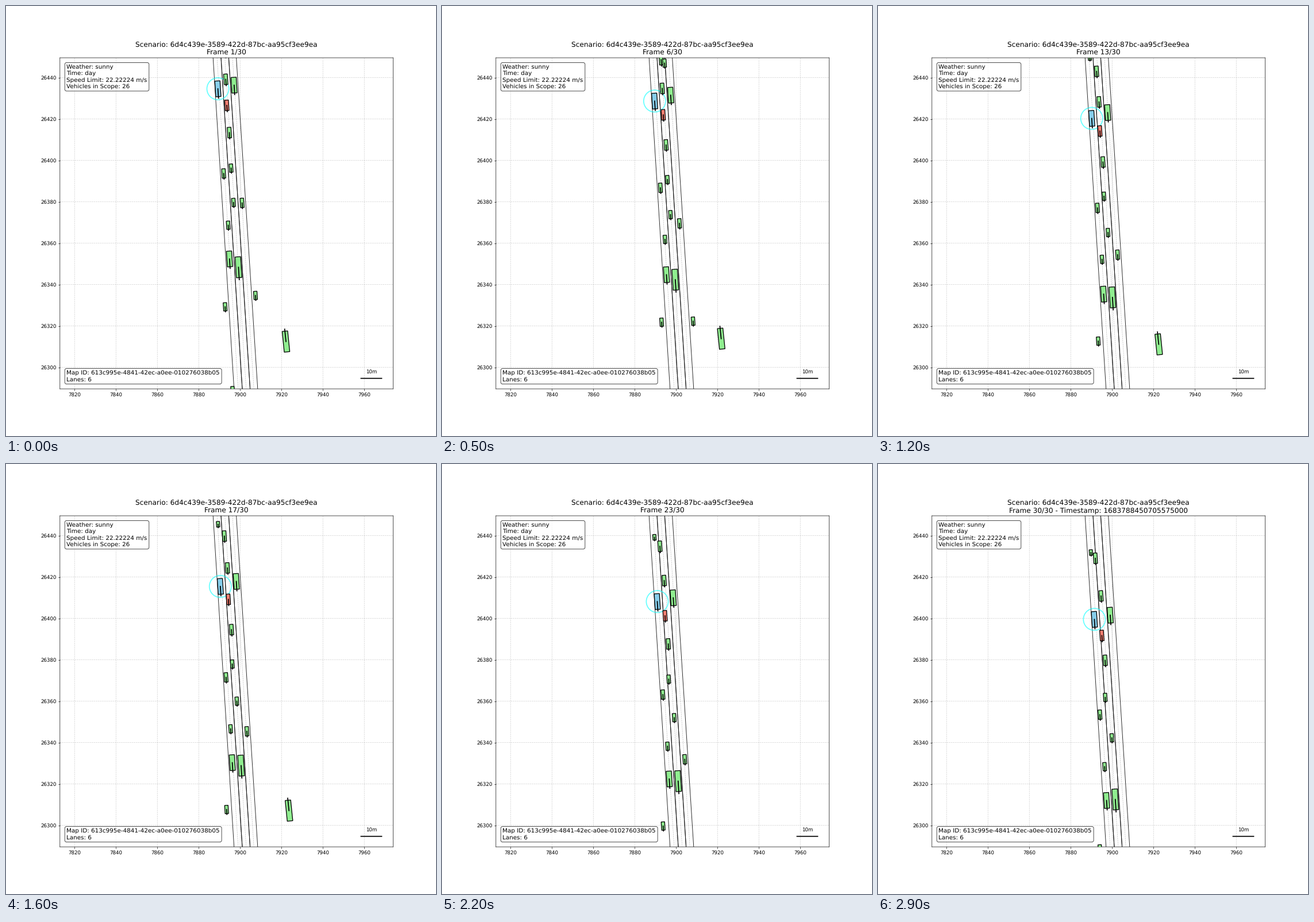
These frames come from a looping animation (748x748 px, 3000 ms). A matplotlib script:

```python
import numpy as np
import matplotlib.pyplot as plt
from matplotlib.animation import FuncAnimation
from matplotlib.patches import Circle, Polygon

plt.rcParams.update({"font.family": "DejaVu Sans",
                     "text.hinting": "no_hinting",
                     "path.snap": False})

STAGE = 748
FRAMES = 30
SCALE = STAGE * 0.77 / 160          # pixels per metre
NUDGE = 0.31                        # sub-pixel shift of the plot, right and down
X0, Y0 = STAGE * 0.125 + NUDGE, STAGE * 0.12 + NUDGE
LEFT, TOP = 7812.92, 26449.59       # map position of the plot's top left corner
FONT = 1.004                        # makes up for the whole-number font dpi

# Width and length in pixels
KINDS = {
    "mini": (5.6, 9.7),
    "small": (6, 14.4),
    "compact": (6.2, 16.3),
    "sedan": (6.5, 18.3),
    "van": (9.1, 27.3),
    "truck": (9.6, 36.2),
}

fig = plt.figure(figsize=(12, 12), dpi=STAGE / 12, facecolor="white")
ax = fig.add_axes([X0 / STAGE, 0.11 - NUDGE / STAGE, 0.775, 0.77])
ax.set_xlim(LEFT, LEFT + STAGE * 0.775 / SCALE)
ax.set_ylim(TOP - 160, TOP)
ax.set_axisbelow(True)
ax.grid(True, linestyle="--", alpha=0.6)
ax.tick_params(labelsize=10 * FONT)


def to_map(px, py):
    """Stage pixels to map metres."""
    return np.array([LEFT + (px - X0) / SCALE, TOP - (py - Y0) / SCALE])


class Vehicle:
    """A box with a heading line that drives from start to end in one loop.

    bend changes the speed evenly over the way, skew shifts the fast part
    to the beginning or to the end.
    """

    def __init__(self, kind, start, end, bend=0, skew=0, first=0,
                 last=FRAMES - 1, color="lightgreen", tilt=3.6, ring=False):
        self.start, self.end = np.array(start), np.array(end)
        self.bend, self.skew = bend, skew
        self.first, self.last = first, last
        width, length = KINDS[kind]
        a = np.radians(tilt)
        ahead = np.array([np.sin(a), -np.cos(a)]) * length / SCALE
        side = np.array([np.cos(a), np.sin(a)]) * width / SCALE
        self.corners = np.array([ahead + side, ahead - side,
                                 -ahead - side, -ahead + side]) / 2
        self.nose = ahead * 0.6
        self.box = ax.add_patch(Polygon(self.corners, facecolor=color,
                                        edgecolor="black", lw=1.5, zorder=4))
        self.line, = ax.plot([], [], color="black", lw=2, zorder=5)
        self.ring = None
        if ring:
            self.ring = ax.add_patch(Circle((0, 0), 0.7 * length / SCALE,
                                            fill=False, edgecolor="cyan",
                                            lw=2, alpha=0.6, zorder=3))

    def place(self, i):
        s = i / (FRAMES - 1)
        way = self.end - self.start
        extra = s * (1 - s) * (self.bend + self.skew * (1 - 2 * s))
        return to_map(*(self.start + way * (s + extra / way[1])))

    def move(self, i):
        shown = self.first <= i <= self.last
        self.box.set_visible(shown)
        self.line.set_visible(shown)
        pos = self.place(i)
        self.box.set_xy(pos + self.corners)
        self.line.set_data(*zip(pos, pos + self.nose))
        if self.ring:
            self.ring.center = pos


def road_line(top_x, bottom_x, **style):
    ax.plot(*zip(to_map(top_x, 89.8), to_map(bottom_x, 665.9)),
            zorder=2, **style)


# Three parallel lanes; shared borders are drawn twice and look heavier.
borders = np.array([(360.2, 396.7), (374, 411), (387.4, 424.6), (400.6, 437.8)])
for lane in zip(borders, borders[1:]):
    for edge in lane:
        road_line(*edge, color="black", lw=1.1, alpha=0.85)
    road_line(*np.mean(lane, axis=0), color="gray", lw=0.8, ls="--", alpha=0.5)

fleet = [
    # Left lane
    Vehicle("van", (368.6, 144), (376.4, 270.3), bend=-3,
            color="skyblue", ring=True),
    Vehicle("compact", (378.7, 291.3), (386.1, 436)),
    Vehicle("small", (386.6, 381.3), (394.2, 526.5), bend=-3),
    Vehicle("van", (388.8, 440), (397.6, 585.3), skew=25),
    Vehicle("small", (381.2, 523.3), (386, 669.5), bend=-9, skew=30),
    Vehicle("mini", (367, 44.3), (370.4, 154), first=8),
    # Middle lane
    Vehicle("sedan", (384.2, 172.8), (389.4, 298.3), bend=-28, skew=-12,
            color="salmon"),
    Vehicle("sedan", (382.3, 127.5), (388, 229.5), bend=-12),
    Vehicle("sedan", (388.6, 220.2), (395.2, 341.5), bend=4),
    Vehicle("small", (391.6, 282), (395.3, 406), bend=-10),
    Vehicle("small", (395.8, 341.7), (406.8, 476.3), bend=-14),
    Vehicle("sedan", (381.8, 79), (378.2, 164), bend=-2),
    Vehicle("small", (386.9, 80.5), (388.5, 190), first=1, last=10),
    Vehicle("small", (394.3, 669), (403, 805), last=1),
    # Right lane and beyond
    Vehicle("van", (396.8, 137.7), (404, 263), bend=-13, skew=-25),
    Vehicle("compact", (410.7, 342.5), (426, 568), bend=-10, skew=-20, last=27),
    Vehicle("truck", (404.4, 454.4), (412.8, 583.5), bend=-4),
    Vehicle("small", (434, 503.5), (450, 758.7), bend=5, last=11),
    Vehicle("truck", (487, 583.7), (517, 693.9), bend=-168, last=17,
            tilt=185.8),
]


def note(y, text, va):
    ax.text(0.02, y, text, transform=ax.transAxes, fontsize=12 * FONT, va=va,
            bbox=dict(boxstyle="round", facecolor="white", alpha=0.8),
            zorder=8)


note(0.98, "Weather: sunny\nTime: day\nSpeed Limit: 22.22224 m/s\n"
           "Vehicles in Scope: 26", "top")
note(0.02, "Map ID: 613c995e-4841-42ec-a0ee-010276038b05\nLanes: 6", "bottom")

# Scale bar
bar_x, bar_y = to_map(617.5, 647.7)
ax.plot([bar_x, bar_x + 10], [bar_y, bar_y], color="black", lw=2, zorder=6)
ax.text(bar_x + 5, bar_y + 2, "10m", ha="center", va="bottom",
        fontsize=10 * FONT, zorder=6)


def draw(i):
    for vehicle in fleet:
        vehicle.move(i)
    title = ("Scenario: 6d4c439e-3589-422d-87bc-aa95cf3ee9ea\n"
             f"Frame {i + 1}/{FRAMES}")
    if i == FRAMES - 1:
        title += " - Timestamp: 1683788450705575000"
    ax.set_title(title, fontsize=14 * FONT, linespacing=1.22)
    return []


anim = FuncAnimation(fig, draw, frames=FRAMES, interval=100, repeat=True,
                     repeat_delay=0, init_func=lambda: draw(0))
plt.show()
```
